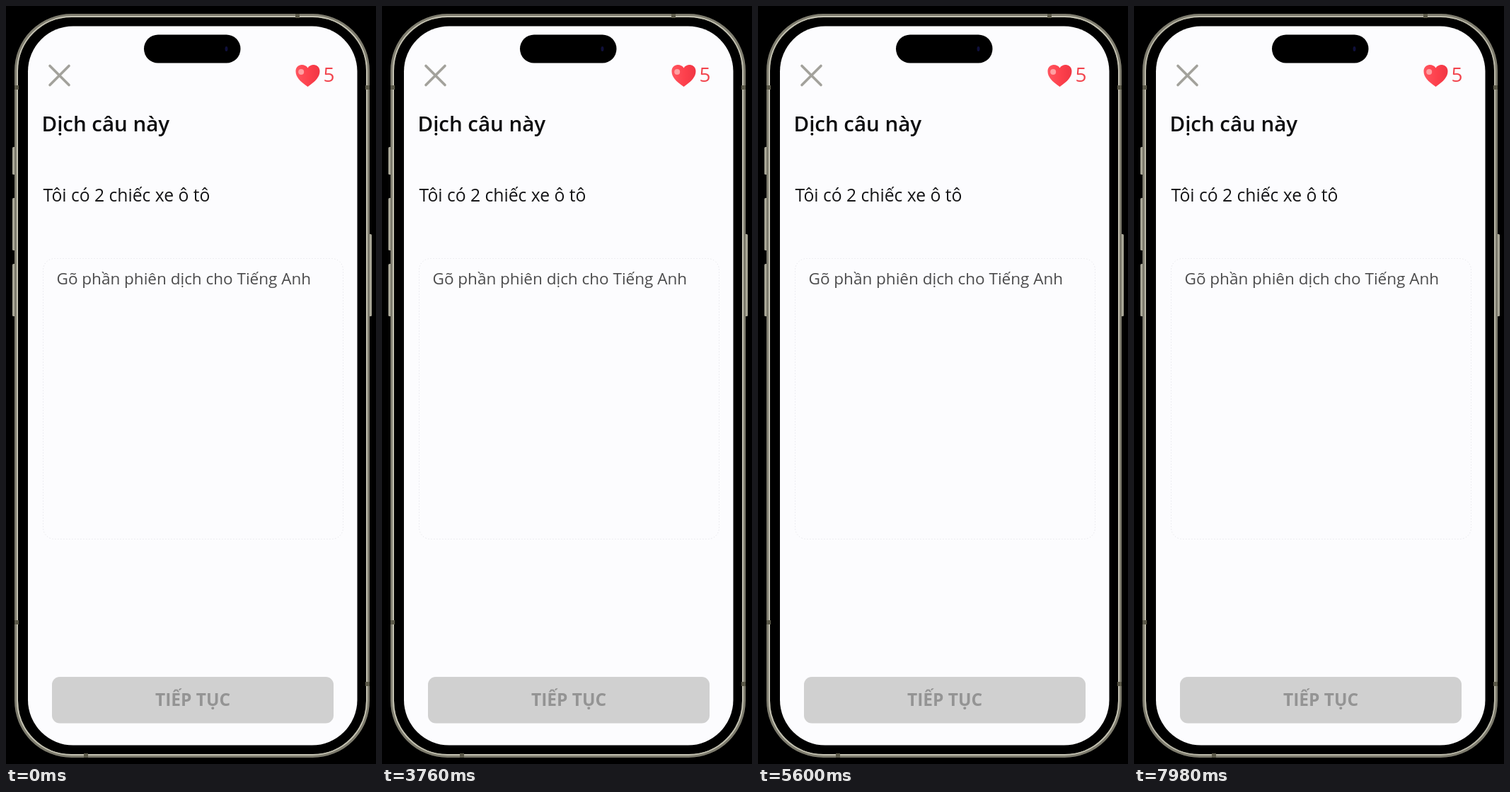
Write an HTML page that moves like this. It is 523x1070 px and loops after 8000 ms.

```html
<!DOCTYPE html>
<html lang="vi">
<head>
<meta charset="utf-8">
<title>Dịch câu này</title>
<style>
  html, body { margin: 0; width: 100%; height: 100%; overflow: hidden; background: #000; }
  svg { display: block; width: 100vw; height: 100vh; }
  text { font-family: "Open Sans", "Noto Sans", sans-serif; }
</style>
</head>
<body>
<svg viewBox="0 0 523 1070">
  <defs>
    <linearGradient id="heart">
      <stop offset="0" stop-color="#ff555f"/>
      <stop offset=".55" stop-color="#fd404c"/>
      <stop offset="1" stop-color="#f03644"/>
    </linearGradient>
  </defs>

  <rect width="523" height="1070"/>

  <!-- side keys -->
  <g fill="#a8a696">
    <rect x="9" y="199" width="5" height="39" rx="1.5"/>
    <rect x="9" y="271" width="5" height="74" rx="1.5"/>
    <rect x="9" y="364" width="5" height="74" rx="1.5"/>
    <rect x="512" y="322" width="5" height="116" rx="1.5"/>
  </g>

  <!-- frame -->
  <g fill="none">
    <rect x="14.5" y="13.5" width="497" height="1045" rx="78" stroke="#7e7c6e" stroke-width="5"/>
    <rect id="glint" x="16" y="15" width="494" height="1042" rx="76.5" stroke="#c4c2b2" stroke-width="2"/>
    <path d="M12 115h6M12 870h6M508 115h6M508 957h6M412 11v6M113 1055v6" stroke="#5a5848" stroke-width="6"/>
  </g>

  <rect x="31" y="28.5" width="465.5" height="1015" rx="64" fill="#fcfcfe"/>
  <rect x="195" y="40.5" width="136.5" height="40" rx="20"/>
  <ellipse cx="311.5" cy="60.5" rx="2" ry="3.5" fill="#10103c"/>

  <path d="M62 84.5L89 111.5M89 84.5L62 111.5" stroke="#a2a19b" stroke-width="3.6" stroke-linecap="round"/>

  <path d="M426.5 114C415 106 409.5 100 409.5 92C409.5 86.5 413.5 83 418 83C421.5 83 425 84.5 426.5 87.5C428 84.5 431.5 83 435 83C439.5 83 443.5 86.5 443.5 92C443.5 100 438 106 426.5 114Z" fill="url(#heart)"/>
  <circle cx="417.2" cy="93" r="4" fill="#ffa0a2"/>
  <text x="448.5" y="107" font-size="28" font-weight="500" fill="#f2434c">5</text>

  <text x="50.5" y="177" font-size="29.5" font-weight="600" fill="#0c0c0e">Dịch câu này</text>
  <text x="52.5" y="276" font-size="24.7" fill="#151517">Tôi có 2 chiếc xe ô tô</text>

  <rect x="52.5" y="356.5" width="424" height="396" rx="16" fill="none" stroke="#dedee4" stroke-dasharray="1 3"/>
  <text x="71.5" y="393" font-size="22.5" fill="#4b4b4c">Gõ phần phiên dịch cho Tiếng Anh</text>

  <rect x="65" y="947" width="398" height="65.5" rx="11" fill="#d0d0d0"/>
  <text x="264" y="988" font-size="24.5" font-weight="700" text-anchor="middle" fill="#949494">TIẾP TỤC</text>
</svg>
<script>
  const LOOP = 8000, DIM_AT = 6040;
  const glint = document.getElementById("glint");

  // The metal edge loses a little shine late in the loop.
  function draw(ms) {
    glint.setAttribute("opacity", ms < DIM_AT ? 1 : 0.88);
  }

  function tick(now) {
    draw(now % LOOP);
    requestAnimationFrame(tick);
  }
  draw(0);
  requestAnimationFrame(tick);
</script>
</body>
</html>
```
